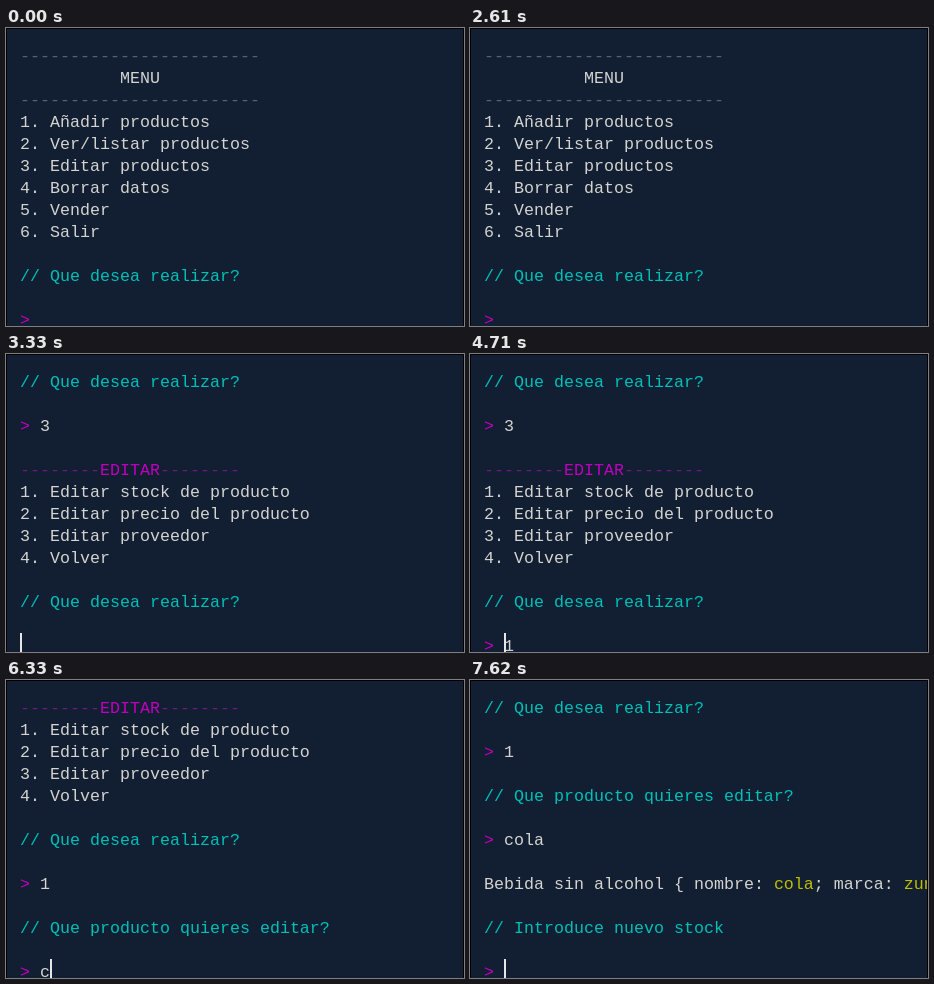
Recreate the animation shown at these times as an HTML page. Size 458 px wide and 298 px high, loop 8 s.

```html
<!DOCTYPE html>
<html lang="es">
<head>
<meta charset="utf-8">
<title>Menu de productos</title>
<style>
  html, body { margin: 0; width: 100%; height: 100%; overflow: hidden; background: #121e31; }

  .stage { position: relative; width: 458px; height: 298px; overflow: hidden; background: #121e31; }
  .stage::after {
    content: ""; position: absolute; inset: 0;
    border: solid #000; border-width: 1px 1px 0;
  }

  .log, .log span, .caret, .type { animation: 8s step-end infinite; }

  .log {
    position: absolute; left: 14px; top: 18px; margin: 0;
    font: 16.664px/22px "Liberation Mono", "Courier New", monospace;
    font-variant-ligatures: none;
    color: #d4d4d0; white-space: pre;
    animation-name: scroll;
  }
  .log b { font-weight: normal; }
  .rule { color: #566271; }
  .ask { color: #00c0b8; }
  .mark { color: #c000c0; }
  .dash { color: #6a1a80; }
  .value { color: #c0c000; }

  /* typed rows are uncovered one 10px cell at a time */
  .log .type { display: inline-block; height: 22px; overflow: hidden; vertical-align: top; }
  .log .menu { animation-name: type-menu; }
  .log .edit { animation-name: type-edit; }
  .log .item { animation-name: type-item; }
  .log .stock { animation-name: type-stock; }

  .caret {
    position: absolute; left: 14px; top: 279px; width: 2px; height: 19px;
    background: #e6e6e6; animation-name: caret;
  }

  @keyframes scroll {
    0%      { transform: translateY(0); }
    41.625% { transform: translateY(-220px); }
    61.5%   { transform: translateY(-308px); }
    92.25%  { transform: translateY(-440px); }
  }
  @keyframes type-menu {
    0%      { width: 20px; }
    37.875% { width: 30px; }
  }
  @keyframes type-edit {
    0%      { width: 0; }
    44.625% { width: 20px; }
    57%     { width: 30px; }
  }
  @keyframes type-item {
    0%      { width: 0; }
    64.5%   { width: 20px; }
    79.125% { width: 30px; }
    80.625% { width: 40px; }
    83.25%  { width: 50px; }
    84.75%  { width: 60px; }
  }
  @keyframes type-stock {
    0%     { width: 0; }
    95.25% { width: 20px; }
  }
  @keyframes caret {
    0%, 20.625%, 32.625% { transform: translateX(20px); opacity: 0; }
    14.625%, 26.625%     { transform: translateX(20px); opacity: 1; }
    37.875% { transform: translateX(30px); opacity: 1; }
    39.375% { transform: translateX(20px); opacity: 1; }

    41.625% { transform: translateX(0); opacity: 1; }
    44.625% { transform: translateX(20px); opacity: 1; }
    50.625% { transform: translateX(20px); opacity: 0; }
    56.625% { transform: translateX(20px); opacity: 1; }
    57%     { transform: translateX(30px); opacity: 1; }
    58.875% { transform: translateX(20px); opacity: 1; }

    61.5%   { transform: translateX(0); opacity: 1; }
    64.5%   { transform: translateX(20px); opacity: 1; }
    70.125% { transform: translateX(20px); opacity: 0; }
    75.75%  { transform: translateX(20px); opacity: 1; }
    79.125% { transform: translateX(30px); opacity: 1; }
    80.625% { transform: translateX(40px); opacity: 1; }
    83.25%  { transform: translateX(50px); opacity: 1; }
    84.75%  { transform: translateX(60px); opacity: 1; }
    89.625% { transform: translateX(20px); opacity: 1; }
    91.875% { transform: translateX(20px); opacity: 0; }

    92.25%  { transform: translateX(0); opacity: 1; }
    95.25%  { transform: translateX(20px); opacity: 1; }
  }
</style>
</head>
<body>
<div class="stage">
<pre class="log"><b class="rule">------------------------</b>
          MENU
<b class="rule">------------------------</b>
1. Añadir productos
2. Ver/listar productos
3. Editar productos
4. Borrar datos
5. Vender
6. Salir

<b class="ask">// Que desea realizar?</b>

<span class="type menu"><b class="mark">&gt;</b> 3</span>

<b class="dash">--------</b><b class="mark">EDITAR</b><b class="dash">--------</b>
1. Editar stock de producto
2. Editar precio del producto
3. Editar proveedor
4. Volver

<b class="ask">// Que desea realizar?</b>

<span class="type edit"><b class="mark">&gt;</b> 1</span>

<b class="ask">// Que producto quieres editar?</b>

<span class="type item"><b class="mark">&gt;</b> cola</span>

Bebida sin alcohol { nombre: <b class="value">cola</b>; marca: <b class="value">zunvelta</b>

<b class="ask">// Introduce nuevo stock</b>

<span class="type stock"><b class="mark">&gt;</b> </span></pre>
<div class="caret"></div>
</div>
</body>
</html>
```
